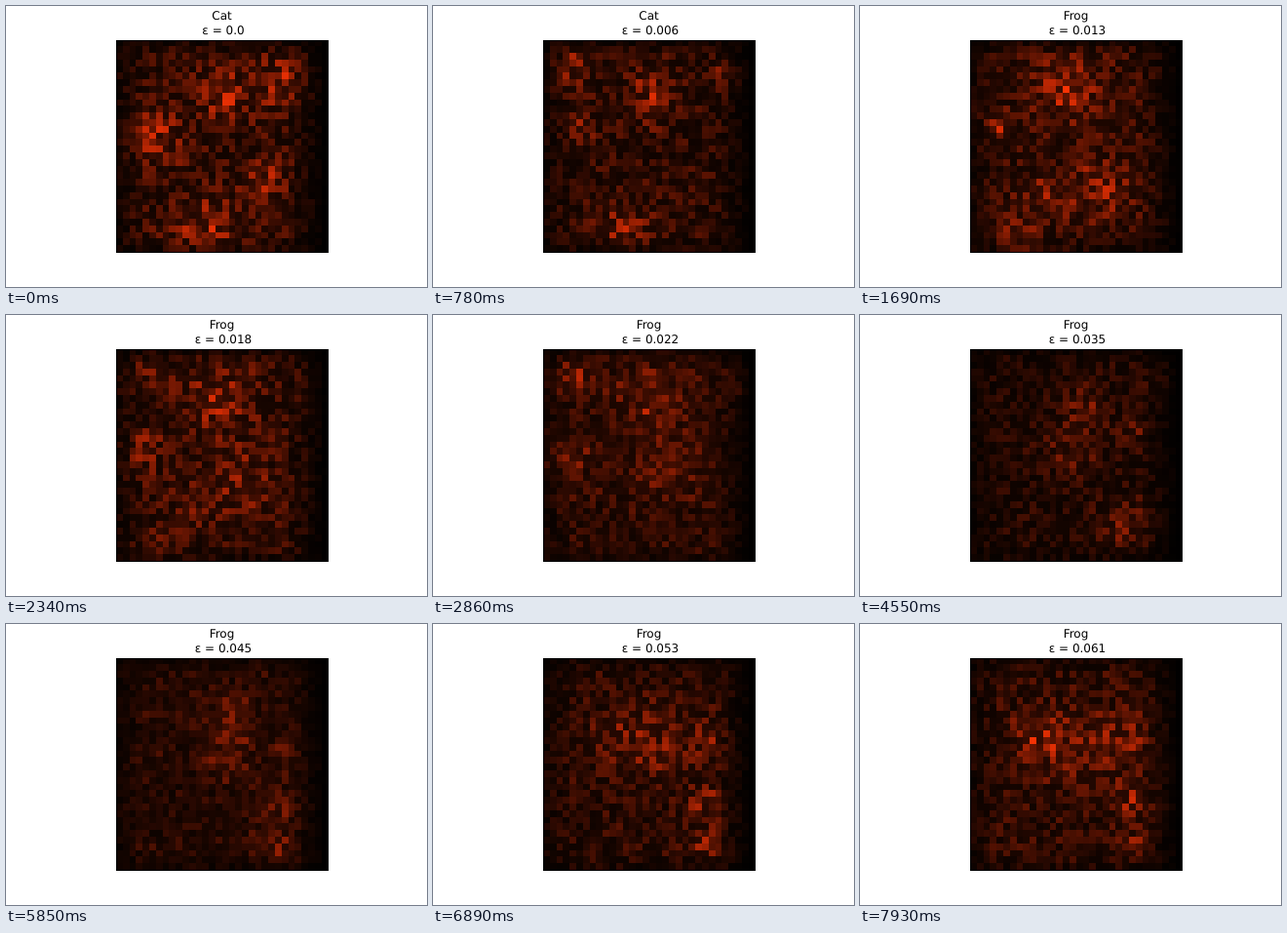
An HTML page that plays this animation: 432x288 px, repeating every 8 s.

```html
<!DOCTYPE html>
<html lang="en">
<head>
<meta charset="utf-8">
<title>Saliency by epsilon</title>
<style>
  html, body { margin: 0; width: 100%; height: 100%; overflow: hidden; background: #fff; }
  svg { display: block; width: 432px; height: 288px; }
  text { font: 12px "DejaVu Sans", sans-serif; text-anchor: middle; text-rendering: geometricPrecision; }
</style>
</head>
<body>
<svg viewBox="0 0 432 288">
  <text id="label" x="221.5" y="14"></text>
  <text id="epsilon" x="223" y="29"></text>
  <g id="cells" shape-rendering="crispEdges"></g>
  <rect x="113.5" y="35.5" width="217" height="217" fill="none" stroke="#000"/>
</svg>
<script>
const SIZE = 32, LEFT = 113, TOP = 34.5, CELL = 6.795;
const STEP = 130, LOOP = 8000, FROG_STEP = 10;
const BASE = .21, GLOW = .3, GRAIN_STEPS = 6;

// Where the heat gathers over time; each spot is column, row, radius
const moments = [
  { step: 0, gain: 1.05, spots: [[16, 8, 4], [25, 6, 4], [6, 14, 4], [22, 20, 3], [13, 28, 5]] },
  { step: 6, gain: .95, spots: [[4, 4, 3], [16, 8, 4], [27, 5, 2], [5, 13, 2], [12, 28, 4]] },
  { step: 13, gain: 1.1, spots: [[14, 7, 5], [4, 13, 2], [11, 23, 3], [19, 22, 4], [7, 29, 3]] },
  { step: 22, gain: 1, spots: [[16, 7, 5], [29, 5, 2], [4, 4, 3], [3, 16, 3], [18, 18, 4]] },
  { step: 35, gain: .72, spots: [[17, 8, 3], [15, 14, 4], [28, 4, 2], [24, 12, 2], [23, 26, 4]] },
  { step: 45, gain: .85, spots: [[16, 13, 4], [17, 8, 3], [25, 13, 2], [24, 22, 3], [24, 28, 3]] },
  { step: 61, gain: 1, spots: [[14, 13, 5], [23, 12, 4], [9, 11, 3], [24, 21, 3], [24, 28, 2]] }
];

const mix = (a, b, t) => a + (b - a) * t;

// Repeatable noise in 0..1
function noise(cell, seed) {
  let h = Math.imul(cell + 1, 374761393) ^ Math.imul(seed + 7, 668265263);
  h = Math.imul(h ^ (h >>> 13), 1274126177);
  h = Math.imul(h ^ (h >>> 15), 2246822519);
  return ((h ^ (h >>> 16)) >>> 0) / 4294967296;
}

// Each cell drifts smoothly from one random brightness to the next
function grain(cell, step) {
  const knot = Math.floor(step / GRAIN_STEPS);
  const t = step / GRAIN_STEPS - knot;
  const n = mix(noise(cell, knot), noise(cell, knot + 1), t * t * (3 - 2 * t));
  return .3 + 1.5 * n ** 1.7;
}

function heat({ gain, spots }, c, r) {
  const glow = spots.reduce((sum, [x, y, radius]) =>
    sum + Math.exp(-((c - x) ** 2 + (r - y) ** 2) / radius ** 2), 0);
  return gain * (BASE + GLOW * glow);
}

// The picture darkens toward its borders, most of all on the right
const vignette = (c, r) =>
  Math.min(1, .5 + c / 8, .04 + (SIZE - 1 - c) / 6) * Math.min(1, .5 + r / 4, .6 + (SIZE - 1 - r) / 5);

const label = document.getElementById("label");
const epsilon = document.getElementById("epsilon");
const group = document.getElementById("cells");
const edge = (start, i) => Math.round(start + i * CELL);

const cells = Array.from({ length: SIZE * SIZE }, (_, i) => {
  const c = i % SIZE, r = Math.floor(i / SIZE);
  const rect = document.createElementNS("http://www.w3.org/2000/svg", "rect");
  const x = edge(LEFT, c), y = edge(TOP, r);
  const box = { x, y, width: edge(LEFT, c + 1) - x, height: edge(TOP, r + 1) - y };
  for (const name in box) rect.setAttribute(name, box[name]);
  return group.appendChild(rect);
});

function draw(step) {
  const next = Math.max(1, moments.findIndex(m => m.step >= step));
  const from = moments[next - 1], to = moments[next];
  const t = (step - from.step) / (to.step - from.step);

  cells.forEach((cell, i) => {
    const c = i % SIZE, r = Math.floor(i / SIZE);
    const level = mix(heat(from, c, r), heat(to, c, r), t);
    const v = Math.min(1, level * grain(i, step) * vignette(c, r));
    cell.setAttribute("fill", `rgb(${[255, 52, 4].map(channel => Math.round(channel * v))})`);
  });
  label.textContent = step < FROG_STEP ? "Cat" : "Frog";
  epsilon.textContent = "ε = " + (step ? step / 1000 : "0.0");
}

let shown = -1;
const start = performance.now();
function tick() {
  const step = Math.floor(((performance.now() - start) % LOOP) / STEP);
  if (step !== shown) draw(shown = step);
  requestAnimationFrame(tick);
}
tick();
</script>
</body>
</html>
```
